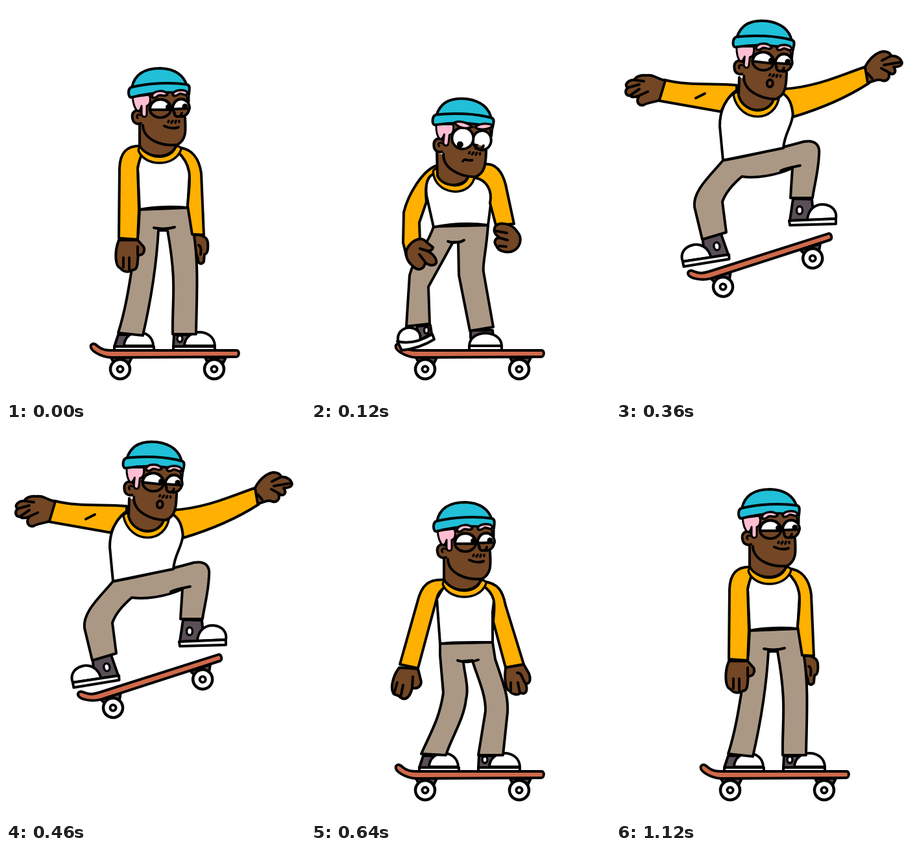
These frames come from a looping animation (461 by 606 pixels, 1.36 s). An HTML page:

```html
<!DOCTYPE html>
<html lang="en">
<head>
<meta charset="utf-8">
<title>Skateboard jump</title>
<style>
  html, body { margin: 0; width: 100%; height: 100%; overflow: hidden; background: #fff; }
  svg { display: block; width: 100%; height: 100%; }
  .pose { opacity: 0; stroke: #000; stroke-width: 4; stroke-linecap: round; stroke-linejoin: round; }
</style>
</head>
<body>
<svg id="stage" viewBox="0 0 461 606"></svg>
<script>
const SKIN = '#734625', TEAL = '#21bfd8', PINK = '#ffbdd2', ORANGE = '#ffb000',
      KHAKI = '#ab9884', RED = '#cf6a4b', DARK = '#5a4f57', WHITE = '#fff', BLACK = '#000';

const part = (fill, d, width = 4) => `<path d="${d}" fill="${fill}" stroke-width="${width}"/>`;
const line = (d, width = 4) => part('none', d, width);
const oval = (fill, x, y, rx, ry = rx, width = 4) =>
  `<ellipse cx="${x}" cy="${y}" rx="${rx}" ry="${ry}" fill="${fill}" stroke-width="${width}"/>`;
const moved = (transform, content) => `<g transform="${transform}">${content}</g>`;
const dot = (x, y, r) => oval(BLACK, x, y, r, r, 0);

// Board coordinates start at the centre of the rear wheel.
const wheel = x => part(DARK, `M${x - 14} -18H${x + 18}L${x + 12} -6H${x - 8}Z`) +
  oval(WHITE, x, 0, 15, 15, 4.5) + oval(WHITE, x, 0, 4.5, 4.5, 4);
const board = (x, y, angle = 0) => moved(`translate(${x} ${y}) rotate(${angle})`,
  wheel(0) + wheel(145) +
  part(RED, 'M-45 -37C-42 -41 -38 -39 -34 -35C-28 -30 -22 -29 -12 -29L180 -29C184 -29 184 -19 179 -19L-14 -18C-30 -19 -48 -29 -45 -37Z'));

// Every head is the same drawing, placed by its left eye.
const eyes = {
  sleepy: oval(SKIN, 270, 157, 12.5, 13.5) + part(WHITE, 'M257 159C257 139 283 139 283 158Z') + dot(276, 155, 4.5) +
    oval(SKIN, 238, 158, 16.5, 14) + part(WHITE, 'M222 160C222 139 254 139 254 160Z') + dot(251, 156, 5),
  wide: oval(WHITE, 268, 157, 14, 15) + oval(WHITE, 238, 157, 16.5) + dot(235, 167, 5) + dot(261, 168, 4.5)
};
const brows = {
  sleepy: part(PINK, 'M225 139C227 129 246 129 249 136C246 141 240 136 235 138C231 142 226 143 225 139Z', 3.5) +
    part(PINK, 'M257 136C260 128 277 128 280 134C279 140 272 135 268 135C263 139 258 140 257 136Z', 3.5),
  wide: part(PINK, 'M223 134C231 130 243 132 251 138C242 143 228 142 223 134Z', 3.5) +
    part(PINK, 'M255 138C262 131 274 129 282 132C279 139 263 143 255 138Z', 3.5)
};
const mouths = {
  smile: line('M244 185C252 189 260 189 266 187'),
  frown: line('M242 192C245 186 248 192 256 189'),
  oh: oval(SKIN, 252, 191, 4.5, 5.5),
  shout: oval(BLACK, 249, 191, 6, 8) + oval(PINK, 249, 195, 2.5, 3.5, 0)
};
const head = (x, y, angle, look, mouth) => moved(
  `translate(${x} ${y}) rotate(${angle}) translate(-238 -156)`,
  part(SKIN, 'M197 138L281 134V150L276 172C277 190 279 206 263 214C240 217 213 206 211 184L204 178Z', 0) +
  line('M281 136V150M276 172C277 190 279 206 264 214C240 217 212 206 211 184') +
  part(SKIN, 'M208 163C200 158 193 164 195 173C196 181 203 183 208 181') +
  line('M203 173C200 170 203 166 207 168', 3) +
  part(PINK, 'M195 140C196 151 198 158 203 162C207 162 208 158 209 154V166C210 173 217 172 217 166V154C222 153 224 145 221 137Z', 3) +
  part(PINK, 'M277 135H282V149Z', 3) +
  eyes[look] +
  part(SKIN, 'M259 165C261 173 270 172 271 165') +
  line('M250 179l1-2M255 180l2-3M261 180l1-3M267 179l0-2', 3.5) +
  mouths[mouth] +
  part(TEAL, 'M194 126C198 105 214 96 238 96C261 97 274 107 279 123Z') +
  part(TEAL, 'M194 125C220 119 254 117 279 121C284 122 283 128 282 136C255 131 224 133 193 141C188 141 187 127 194 125Z') +
  brows[look]);

const collar = d => line(d, 13) + line(d, 6).replace('<path', `<path stroke="${ORANGE}"`);
const neck = d => part(SKIN, d);

const shoe = transform => moved(transform,
  part(DARK, 'M273 297L302 298L304 318L296 330L268 331Z') +
  part(WHITE, 'M295 330C296 313 308 305 320 306C334 307 341 317 339 328Z') +
  part(WHITE, 'M267 331L339 328V336L268 338Z') + oval(WHITE, 283, 315, 4.5, 6, 3.5));

const parkedShoes =
  part(DARK, 'M173 507H194L188 525H167Z') +
  part(WHITE, 'M182 524C183 496 226 496 227 524Z') + part(WHITE, 'M167 525H228V531H167Z') +
  part(DARK, 'M259 507H282L277 525H258Z') + oval(WHITE, 268, 513, 4, 5, 3.5) +
  part(WHITE, 'M275 524C276 496 321 496 322 524Z') + part(WHITE, 'M258 525H322V531H258Z');

const poses = {
  stand: board(176, 560) + parkedShoes +
    part(SKIN, 'M288 355C296 350 309 354 311 364C312 374 311 382 306 383L305 394C302 400 295 397 296 390L292 378Z') +
    line('M297 369C301 370 301 376 300 383') +
    part(KHAKI, 'M206 314L281 311L290 354C297 400 294 450 293 506L257 506C256 450 264 430 249 346L235 346C232 400 222 460 211 508L173 504C190 450 193 400 204 350Z') +
    line('M228 342C238 344 250 344 260 341') +
    part(WHITE, 'M208 222L203 250L206 314C230 309 260 309 280 311L283 260L286 232L265 220Z') +
    part(ORANGE, 'M264 218C287 219 298 236 301 258L305 353L287 352L280 308C283 270 290 248 264 224Z') +
    part(ORANGE, 'M211 216C185 214 176 227 175 250L174 358L203 360L205 313L203 250C205 238 208 232 211 224Z') +
    part(SKIN, 'M174 361C167 378 168 401 176 404C182 411 190 411 195 407C205 407 202 392 204 384C212 385 215 377 212 371L203 361Z') +
    line('M181 388V403M190 388V406M203 371V384') +
    collar('M209 222C217 242 256 243 265 221') +
    neck('M206 178V215C216 236 254 237 262 216V205') +
    head(238, 156, 0, 'sleepy', 'smile'),

  crouch: board(176, 560) +
    part(DARK, 'M163 494L184 492L186 505L168 515Z') + oval(WHITE, 178, 500, 3.5, 5, 3.5) +
    part(WHITE, 'M135 520C130 502 145 493 158 497C172 502 170 516 164 521Z') +
    part(WHITE, 'M133 517C152 522 172 515 187 506L190 514C174 524 156 529 140 531Z') +
    part(DARK, 'M246 500H280L281 512H246Z') +
    part(WHITE, 'M244 531V524C245 498 293 498 294 524V531Z') + line('M245 524H294') +
    part(KHAKI, 'M189 340L273 338C270 380 264 400 266 410L281 495L245 501L228 415L227 364L219 364L181 433L183 490L147 494L152 415C160 385 180 370 189 340Z') +
    line('M211 363C220 366 230 365 236 361') +
    part(WHITE, 'M188 254C178 262 176 275 178 292L189 341C215 336 245 334 273 338L279 290L272 266L253 256Z') +
    part(ORANGE, 'M253 260L266 244C287 241 296 260 300 275L313 336L285 338L276 304C280 285 271 268 253 265Z') +
    part(ORANGE, 'M194 246C172 253 150 290 143 318L142 365L147 385L168 362L167 334L178 302C175 275 179 259 194 258Z') +
    part(SKIN, 'M150 371C158 360 170 355 178 364L188 372C187 378 182 378 178 377C190 382 196 393 192 398C186 402 180 398 176 396C174 408 164 408 158 402C149 395 142 382 150 371Z') +
    line('M168 374L180 378M167 383L177 396') +
    part(SKIN, 'M284 340C290 332 310 335 318 348C327 358 323 375 308 379C296 381 288 376 286 370C281 364 284 358 290 357C283 352 281 346 284 340Z') +
    line('M286 347L302 350M289 357L303 361M290 370L301 371') +
    collar('M193 256C196 286 239 290 247 265') +
    neck('M194 226L195 262C203 280 236 281 243 262V245') +
    head(234, 203, 6, 'wide', 'frown'),

  pop:
    part(DARK, 'M139 478L175 482L168 513L134 506Z') +
    part(WHITE, 'M133 506C125 520 129 536 139 538C155 540 170 528 168 512C155 513 145 511 133 506Z') +
    part(DARK, 'M259 424L294 436L295 455L270 468L247 449Z') + oval(WHITE, 271, 444, 5, 6, 3.5) +
    part(WHITE, 'M247 447L243 455L270 470L283 472L282 464L269 461Z') +
    part(WHITE, 'M294 454C306 446 319 455 316 463C312 472 303 471 297 471Z') +
    board(176, 559, -32.4) +
    part(KHAKI, 'M181 326C215 310 250 302 280 305C296 318 310 333 316 347C322 360 313 395 293 438L258 425L276 367C264 355 252 343 241 334L219 342C205 390 185 430 175 487L137 480C145 430 165 380 181 326Z') +
    line('M216 338C235 338 248 332 252 325') +
    part(WHITE, 'M207 210C190 222 182 235 177 258L183 323C215 310 250 302 280 305L286 245C284 220 275 202 262 198Z') +
    part(ORANGE, 'M266 195C285 181 306 164 327 163C321 172 324 185 330 196C306 203 294 215 287 244C285 225 278 206 266 199Z') +
    part(SKIN, 'M328 163C334 152 345 150 353 151C362 147 370 151 370 158C379 158 380 166 375 170C379 179 367 184 358 182C352 184 346 194 336 193C322 192 321 172 328 163Z') +
    line('M342 160C347 158 352 160 357 163L370 158M357 171L375 170M329 180L336 185M350 181L358 182') +
    part(ORANGE, 'M168 173C140 176 112 193 112 209C117 230 160 240 176 258C177 245 183 232 190 225L205 208L171 204Z') +
    collar('M205 208C208 230 239 231 247 211') +
    neck('M203 180L207 207C213 223 238 225 244 207V195') +
    head(238, 147, 6, 'wide', 'shout') +
    part(SKIN, 'M168 173C180 171 200 180 209 187C216 196 207 206 199 199C192 212 182 206 176 209C168 210 157 207 156 204C155 190 160 180 168 173Z') +
    line('M184 181L204 186M180 189L199 199M176 198L188 204M141 217L156 205M164 209L172 215'),

  air: board(165, 433, -17.6) +
    shoe('') + shoe('translate(139 391) rotate(-11) scale(-1 1) translate(-303 -332)') +
    part(KHAKI, 'M165 238C200 232 250 220 290 209C308 206 315 215 313 230C312 255 306 275 303 296L269 296L272 250C245 262 215 266 194 263C180 275 168 290 164 302L170 349L133 360L121 310C118 285 145 262 165 238Z') +
    line('M254 254C262 250 275 248 284 246') +
    part(WHITE, 'M183 132C168 140 160 165 160 185L165 238L258 219C260 195 272 185 273 165C270 145 265 135 252 132Z') +
    part(ORANGE, 'M186 122C145 119 110 123 75 114L66 146L162 163C168 148 177 136 186 130Z') +
    line('M123 142L137 135') +
    part(SKIN, 'M76 115C62 112 58 105 46 107C36 106 30 110 28 114C18 114 12 122 18 126C12 132 16 140 22 138C24 142 32 140 36 138C30 146 34 154 42 153C50 148 62 148 67 145Z') +
    line('M28 114L43 116M18 126L36 121M22 138L36 128M36 138L49 132') +
    part(ORANGE, 'M258 128C310 125 350 105 384 94L390 119C350 145 310 160 273 171C272 150 266 140 256 134Z') +
    part(SKIN, 'M384 94C390 82 400 72 412 70C420 70 424 74 424 77C434 76 440 82 441 88C440 94 432 94 428 94C434 102 428 108 420 103C424 112 416 118 408 114C400 112 396 118 388 118Z') +
    line('M410 84L424 77M413 91L437 87M409 96L422 103M388 104L395 112') +
    collar('M186 138C195 175 243 175 247 138') +
    neck('M190 110L189 138C197 168 242 168 244 138V125') +
    head(227, 83, 6, 'sleepy', 'oh'),

  level:
    part(DARK, 'M143 338L174 337L178 355L165 370L142 366Z') +
    part(WHITE, 'M126 386C122 360 162 356 160 386Z') +
    part(WHITE, 'M130 384C158 391 164 374 174 350L179 356C172 374 166 388 154 390Z') +
    oval(WHITE, 168, 349, 3.5, 5, 3.5) +
    shoe('translate(300 388) rotate(16) translate(-303 -334)') +
    board(158, 421, 4.7) +
    part(WHITE, 'M184 148C175 165 165 175 160 183L157 230L247 230C255 210 260 195 260 184C260 165 258 150 250 148Z') +
    part(KHAKI, 'M136 250C135 232 150 224 175 227C215 224 250 228 270 230C300 232 306 250 307 270L312 348L271 352L267 272L215 261C200 266 185 264 176 263L174 338L135 340Z') +
    line('M165 227C172 230 178 234 182 238') +
    part(ORANGE, 'M186 132C160 133 146 135 130 141C108 150 86 146 64 146L62 178C95 182 130 186 160 180C172 170 180 158 185 146Z') +
    line('M115 163L138 155') +
    part(SKIN, 'M64 146C56 136 44 130 34 136C22 138 18 145 20 148C10 152 8 166 16 166C22 168 26 164 28 162C18 170 22 180 30 180C40 186 52 182 62 178Z') +
    line('M20 148L37 142M16 166L34 147M28 162L39 154') +
    part(ORANGE, 'M255 142C290 140 340 145 371 156C366 168 370 180 366 190C330 186 295 188 260 184C262 168 260 157 250 151Z') +
    part(SKIN, 'M370 161C385 159 400 165 414 164C426 166 430 178 424 186C418 190 410 188 406 188C406 202 392 204 384 198C374 196 368 194 367 190Z') +
    line('M384 187C386 175 400 174 405 188M402 171C409 167 415 175 414 186M416 168C420 172 420 180 418 186') +
    collar('M186 147C194 179 227 183 236 162') +
    neck('M192 122L189 148C197 174 228 177 233 160V145') +
    head(228, 102, 6, 'sleepy', 'oh'),

  land: board(176, 560) + parkedShoes +
    part(KHAKI, 'M199 334L280 332L284 358C302 410 304 420 303 440L296 506L258 506L269 438C270 410 252 375 249 360L235 361C236 380 244 400 239 420C236 450 216 480 208 506L170 504C185 470 198 450 204 410L199 352Z') +
    line('M226 360C236 363 248 363 258 359') +
    part(WHITE, 'M206 244L194 265L199 334C225 331 255 332 280 332L280 285L284 252L266 242Z') +
    part(ORANGE, 'M264 238C290 240 296 255 300 275L328 366L300 371L281 300C282 280 289 260 264 244Z') +
    part(ORANGE, 'M209 236C180 233 170 245 164 270L137 366L165 372L194 264C196 254 203 250 209 244Z') +
    part(SKIN, 'M136 371C125 385 122 405 128 412C134 414 136 414 138 417C148 424 154 412 156 402C165 405 172 398 169 389L165 373Z') +
    line('M133 394L128 411M142 398L138 417M157 385L156 402') +
    part(SKIN, 'M300 371C298 385 299 405 306 407C310 413 319 414 323 410C333 414 334 404 331 396C340 396 338 385 336 380L328 366Z') +
    line('M308 394V407M319 394L322 410M318 379C326 379 325 388 331 396') +
    collar('M208 242C217 262 256 263 265 241') +
    neck('M205 198V235C216 256 254 257 262 236V225') +
    head(238, 176, 0, 'sleepy', 'smile')
};

const LOOP = 1360;
const steps = [[0, 'stand'], [120, 'crouch'], [240, 'pop'], [360, 'air'],
               [520, 'level'], [640, 'land'], [760, 'stand'], [LOOP, 'stand']];

const stage = document.getElementById('stage');
stage.innerHTML = Object.entries(poses)
  .map(([name, art]) => `<g class="pose" id="${name}">${art}</g>`).join('');

for (const name of Object.keys(poses)) {
  const frames = steps.map(([time, pose]) =>
    ({ offset: time / LOOP, opacity: pose === name ? 1 : 0, easing: 'steps(1, end)' }));
  document.getElementById(name).animate(frames, { duration: LOOP, iterations: Infinity });
}
</script>
</body>
</html>
```
